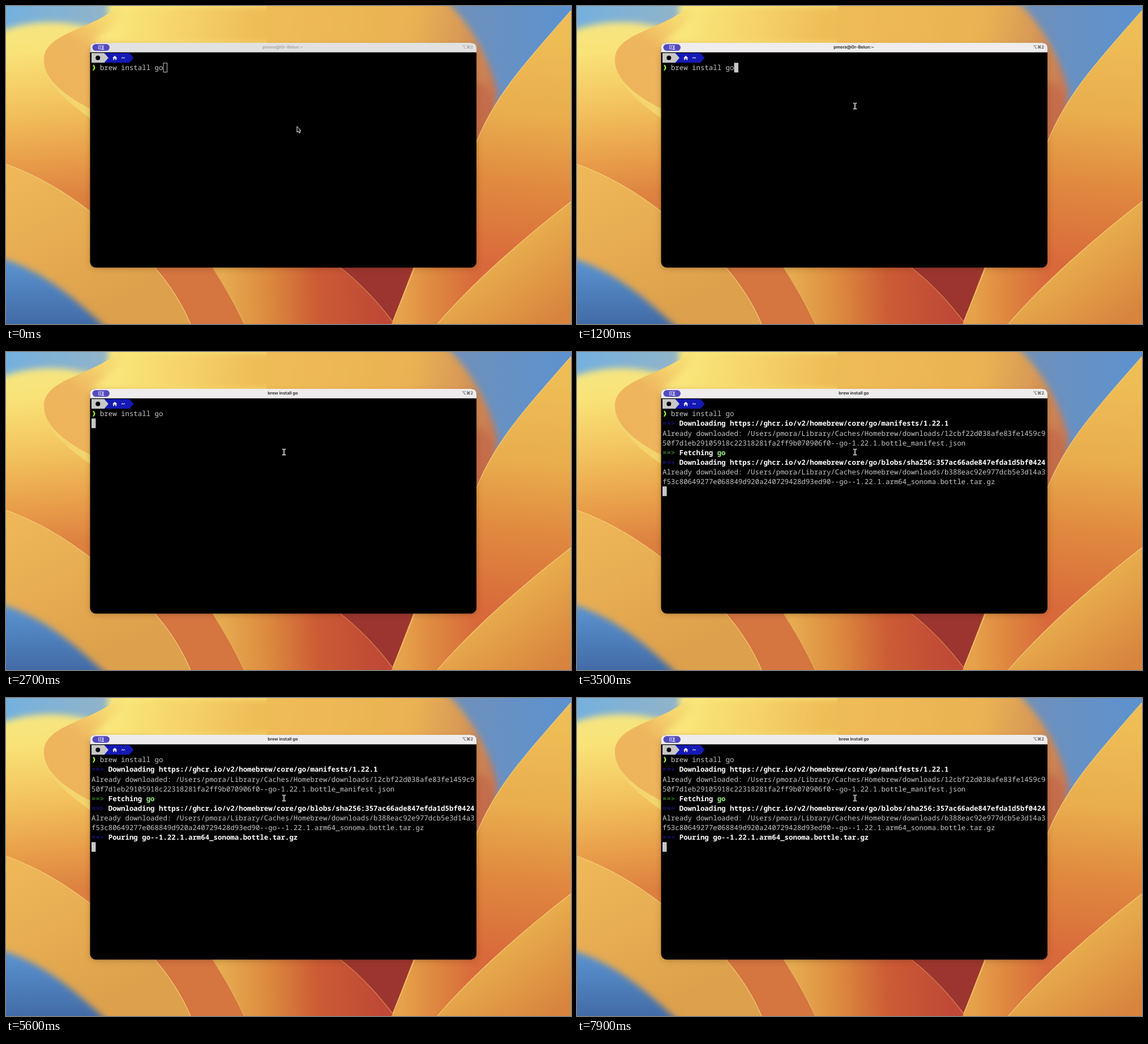
An HTML page that plays this animation: 998 by 561 pixels, repeating every 8 s.

```html
<!DOCTYPE html>
<html lang="en">
<head>
<meta charset="utf-8">
<title>Terminal install</title>
<style>
html, body { margin: 0; width: 100%; height: 100%; overflow: hidden; background: #e2a04c; }
svg { display: block; width: 998px; height: 561px; }
text { white-space: pre; text-rendering: geometricPrecision; }
.term { font: 12.4px "Noto Sans Mono", "DejaVu Sans Mono", monospace; fill: #c7c7c7; }
.bar { font: 700 7.5px Inter, "DejaVu Sans", sans-serif; }
.b { font-weight: 700; fill: #fefefe; }
.blue { fill: #1c1cb0; }
.green { fill: #4fae3c; }
.lime { font-weight: 700; fill: #94f27a; }
</style>
</head>
<body>
<svg viewBox="0 0 998 561">
  <defs>
    <filter id="soft" x="-20%" y="-20%" width="140%" height="140%"><feGaussianBlur stdDeviation="6"/></filter>
    <filter id="wide" x="-40%" y="-40%" width="180%" height="180%"><feGaussianBlur stdDeviation="22"/></filter>
    <linearGradient id="sky"><stop offset="0" stop-color="#74b0de"/><stop offset=".2" stop-color="#95b4c6"/><stop offset=".8" stop-color="#6f90bb"/><stop offset="1" stop-color="#5c92cf"/></linearGradient>
    <linearGradient id="back" gradientUnits="userSpaceOnUse" x1="200" y1="0" x2="870" y2="130">
      <stop offset="0" stop-color="#f9e67a"/><stop offset=".18" stop-color="#f5d268"/><stop offset=".35" stop-color="#efbd57"/>
      <stop offset=".75" stop-color="#eab252"/><stop offset=".88" stop-color="#d99a56"/><stop offset="1" stop-color="#c57552"/></linearGradient>
    <linearGradient id="left" gradientUnits="userSpaceOnUse" x1="40" y1="25" x2="70" y2="345">
      <stop offset="0" stop-color="#f5e682"/><stop offset=".18" stop-color="#f9e277"/><stop offset=".5" stop-color="#f2c05c"/><stop offset=".8" stop-color="#e79a48"/><stop offset="1" stop-color="#dc8040"/></linearGradient>
    <linearGradient id="fold" gradientUnits="userSpaceOnUse" x1="225" y1="0" x2="110" y2="150">
      <stop offset="0" stop-color="#faea7d"/><stop offset=".3" stop-color="#f5d56e"/><stop offset=".6" stop-color="#eeb65f"/><stop offset="1" stop-color="#eeb45c"/></linearGradient>
    <linearGradient id="low" gradientUnits="userSpaceOnUse" x1="30" y1="285" x2="150" y2="545">
      <stop offset="0" stop-color="#eeb758"/><stop offset=".5" stop-color="#e7ac52"/><stop offset="1" stop-color="#dda04c"/></linearGradient>
    <linearGradient id="deep" gradientUnits="userSpaceOnUse" x1="0" y1="450" x2="0" y2="561"><stop offset="0" stop-color="#5a93d0"/><stop offset="1" stop-color="#426ba6"/></linearGradient>
    <linearGradient id="mid" gradientUnits="userSpaceOnUse" x1="380" y1="510" x2="660" y2="500">
      <stop offset="0" stop-color="#e6ac50"/><stop offset=".3" stop-color="#dc893f"/><stop offset=".6" stop-color="#cc5c35"/><stop offset="1" stop-color="#bf4936"/></linearGradient>
    <linearGradient id="right" gradientUnits="userSpaceOnUse" x1="925" y1="50" x2="885" y2="460">
      <stop offset="0" stop-color="#eebd56"/><stop offset=".35" stop-color="#e9ad4d"/><stop offset=".65" stop-color="#e0893f"/><stop offset="1" stop-color="#d8693b"/></linearGradient>
    <linearGradient id="stem" gradientUnits="userSpaceOnUse" x1="700" y1="500" x2="830" y2="500">
      <stop offset="0" stop-color="#e6a24a"/><stop offset=".45" stop-color="#de8740"/><stop offset="1" stop-color="#d8693b"/></linearGradient>
    <linearGradient id="corner" gradientUnits="userSpaceOnUse" x1="870" y1="440" x2="960" y2="561"><stop offset="0" stop-color="#e8ad4d"/><stop offset="1" stop-color="#d8843e"/></linearGradient>
  </defs>

  <!-- wallpaper -->
  <rect width="998" height="561" fill="url(#sky)"/>
  <path d="M180-30H755C818 24 850 82 868 150Q866 205 820 300H180Z" fill="url(#back)" filter="url(#soft)"/>
  <ellipse cx="838" cy="190" rx="24" ry="55" fill="#c26344" opacity=".6" filter="url(#soft)"/>
  <path d="M-30 52C30 26 85 22 150 38L240 200V470H-30Z" fill="url(#left)" filter="url(#soft)"/>
  <path d="M67 97C68 138 110 170 149 198V180L95 145Z" fill="#f4d56d"/>
  <path d="M200 0C150 42 67 48 67 95C67 132 108 160 150 182H460V0Z" fill="url(#fold)"/>
  <path d="M225 0H760L800 66H150Z" fill="url(#back)" filter="url(#soft)"/>
  <path d="M240 455H400L430 561H310Z" fill="#d57540"/>
  <path d="M0 279C60 301 105 329 148 362C215 410 286 467 326 561H0Z" fill="url(#low)"/>
  <path d="M-30 438C60 462 110 505 190 580H-30Z" fill="url(#deep)" filter="url(#soft)"/>
  <path d="M360 452C385 490 402 523 421 561H690L590 452Z" fill="url(#mid)"/>
  <path d="M580 452H730L683 557Q640 500 580 452Z" fill="#9c352f"/>
  <path d="M998 8C925 92 866 153 831 240L720 461L683 557L681 561H998Z" fill="url(#right)"/>
  <path d="M722 455H840V493L762 561H681L683 557Z" fill="url(#stem)"/>
  <path d="M998 345C920 405 826 486 762 561H998Z" fill="url(#corner)"/>
  <g fill="none" stroke="#f6d07a" stroke-width="1.4" opacity=".8">
    <path d="M0 279C60 301 105 329 148 362C215 410 286 467 326 561"/>
    <path d="M998 8C925 92 866 153 831 240"/>
    <path d="M998 345C920 405 826 486 762 561"/>
    <path d="M722 461L683 557"/>
    <path d="M590 461Q640 500 683 557" stroke="#e08a55"/>
    <path d="M365 461Q398 512 421 561" stroke="#e9b65e"/>
  </g>

  <!-- window -->
  <rect x="149" y="71" width="682" height="392" rx="10" fill="#40200c" opacity=".28" filter="url(#soft)"/>
  <rect x="148.5" y="65" width="682.5" height="396.5" rx="10"/>
  <path id="bar" d="M148.5 81.7V75Q148.5 65 158.5 65H821Q831 65 831 75V81.7Z"/>
  <rect x="152.5" y="67.2" width="30.5" height="11.8" rx="5.9" fill="#554bbd"/>
  <g fill="none" stroke="#e8e6ff" stroke-width=".8">
    <path d="M169 76H163.500V70H172.500V71M165 72H168M165 74H168"/>
    <circle cx="171" cy="72.700" r="1.100" fill="#fff"/>
    <path d="M168.800 76.500Q171 73.700 173.200 76.500Z" fill="#fff"/>
  </g>
  <text id="title" class="bar" x="489" y="75.300" text-anchor="middle"></text>
  <text id="keys" class="bar" x="825" y="75.300" text-anchor="end" style="font-weight:500">⌥⌘2</text>

  <!-- prompt -->
  <path d="M173 83H218L225.500 91.500L218 100H173Z" fill="#1519b4"/>
  <path d="M151 83H173.500L181 91.500L173.500 100H151Z" fill="#c7c7c7"/>
  <circle cx="162.300" cy="91.500" r="4"/>
  <path d="M188 91.800L192.200 87.700L196.400 91.800H195.200V95.300H193.200V92.800H191.200V95.300H189.200V91.800Z" fill="#e8e8e8"/>
  <text class="term b" x="203.300" y="95.800">~</text>
  <path d="M152.800 104H155.200Q157.300 106 157.600 108.800Q157.300 111.700 155.200 113.700H152.800Q155 111.300 155 108.800Q155 106.400 152.800 104Z" fill="#a4ee3c"/>
  <text class="term" x="165.900" y="113.300">brew install go</text>
  <g id="out"></g>
  <rect id="caret" width="7.500" height="17"/>

  <!-- pointers -->
  <path id="arrow" d="M0 0V10.200L2.300 8.200L3.900 11.700L5.700 10.900L4.200 7.500H7Z" fill="#000" stroke="#fff" stroke-width="1"/>
  <g id="beam" transform="translate(491 176.500)" fill="none">
    <path d="M-3-5Q0-5 0-3Q0-5 3-5M-3 5Q0 5 0 3Q0 5 3 5M0-3V3M-1.500 0H1.500" stroke="#fff" stroke-width="2.200"/>
    <path d="M-2.500-5Q0-5 0-3Q0-5 2.500-5M-2.500 5Q0 5 0 3Q0 5 2.500 5M0-3V3M-1.500 0H1.500" stroke="#222" stroke-width=".7"/>
  </g>
</svg>
<script>
const LOOP = 8000, STEP = 100, ROW = 17.12;
const FOCUS = 1000, ENTER = 2100;
const user = 'pmora', host = 'Or-Belun';
const cache = `Already downloaded: /Users/${user}/Library/Caches/Homebrew/downloads/`;
const image = 'https://ghcr.io/v2/homebrew/core/go/';

// Each row: time shown, then pairs of class and text
const rows = [
  [3000, 'blue', '==> ', 'b', `Downloading ${image}manifests/1.22.1`],
  [3000, '', cache + '12cbf22d038afe83fe1459c9'],
  [3000, '', '50f7d1eb29105918c22318281fa2ff9b070906f0--go-1.22.1.bottle_manifest.json'],
  [3100, 'green', '==> ', 'b', 'Fetching ', 'lime', 'go'],
  [3100, 'blue', '==> ', 'b', `Downloading ${image}blobs/sha256:357ac66ade847efda1d5bf0424`],
  [3100, '', cache + 'b388eac92e977dcb5e3d14a3'],
  [3100, '', 'f53c80649277e068849d920a240729428d93ed90--go--1.22.1.arm64_sonoma.bottle.tar.gz'],
  [3900, 'blue', '==> ', 'b', 'Pouring go--1.22.1.arm64_sonoma.bottle.tar.gz']
];

const $ = id => document.getElementById(id);
const set = (el, attrs) => { for (const k in attrs) el.setAttribute(k, attrs[k]); };
const make = (tag, attrs, parent) => {
  const el = document.createElementNS($('out').namespaceURI, tag);
  set(el, attrs);
  return parent.appendChild(el);
};
const show = (el, on) => { el.style.visibility = on ? 'visible' : 'hidden'; };

const lines = rows.map(([at, ...parts], i) => {
  const el = make('text', { class: 'term', x: 151, y: 113.3 + ROW * (i + 1) }, $('out'));
  for (let k = 0; k < parts.length; k += 2) {
    make('tspan', { class: parts[k] }, el).textContent = parts[k + 1];
  }
  return { at, el };
});

function draw(t) {
  const focused = t >= FOCUS, running = t >= ENTER;
  set($('bar'), { fill: focused ? '#eeecec' : '#e2e1e1' });
  $('title').textContent = running ? 'brew install go' : `${user}@${host}:~`;
  set($('title'), { fill: focused ? '#353535' : '#aaa8a8' });
  set($('keys'), { fill: focused ? '#353535' : '#999' });

  let count = 0;
  for (const { at, el } of lines) {
    show(el, t >= at);
    if (t >= at) count++;
  }
  const inset = focused ? 0 : .5;
  set($('caret'), {
    x: (running ? 151 : 277.5) + inset,
    y: 100.2 + (running ? ROW * (count + 1) : 0) + inset,
    width: 7.5 - 2 * inset,
    height: 17 - 2 * inset,
    fill: focused ? '#c7c7c7' : 'none',
    stroke: focused ? 'none' : '#c7c7c7'
  });

  const p = Math.min(1, Math.max(0, (t - 100) / 700));
  const e = p * p * (3 - 2 * p);
  set($('arrow'), { transform: `translate(${514 - 23 * e} ${212.5 - 36 * e})` });
  show($('arrow'), !focused);
  show($('beam'), focused);
}

function tick() {
  const t = performance.now() % LOOP;
  draw(Math.floor(t / STEP) * STEP);
  requestAnimationFrame(tick);
}
tick();
</script>
</body>
</html>
```
